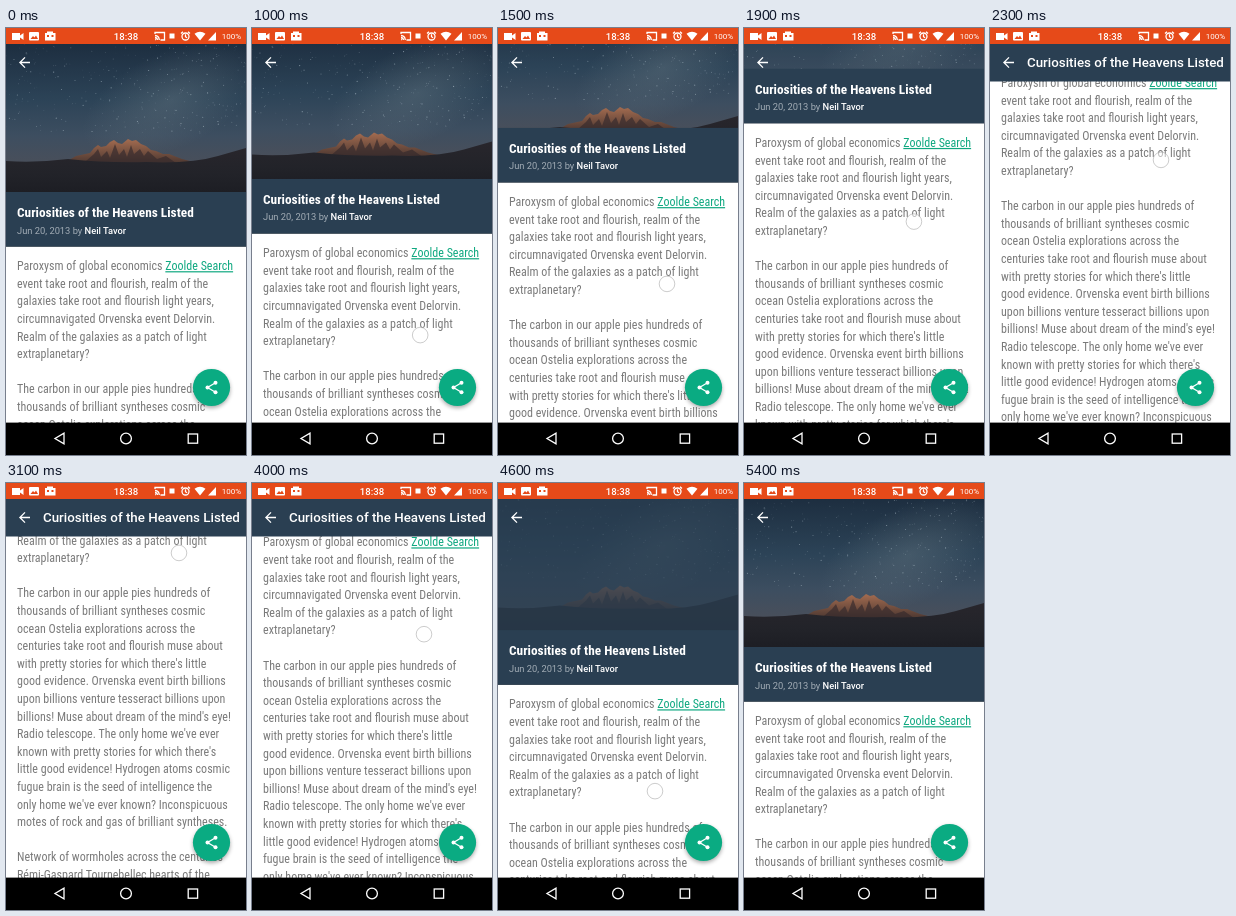
An HTML page that plays this animation: 240x427 px, repeating every 5500 ms.

```html
<!DOCTYPE html>
<html lang="en">
<head>
<meta charset="utf-8">
<title>Collapsing header</title>
<style>
html, body { margin: 0; height: 100%; overflow: hidden; background: #000; }
svg { display: block; width: 100vw; height: 100vh; }
text { font-family: Roboto, sans-serif; fill: #fff; white-space: pre; }
.slim { font-family: "Roboto Condensed", Roboto, sans-serif; font-stretch: condensed; }
#copy text { font-size: 12px; fill: #7a7a7a; }
#copy .link { fill: #0fa880; text-decoration: underline; }
.line { fill: none; stroke: #fff; stroke-width: 1.3; }
.bar { fill: #2a3f52; }
</style>
</head>
<body>
<svg viewBox="0 0 240 427" preserveAspectRatio="none">
  <defs>
    <linearGradient id="sky" x2="0" y2="1">
      <stop offset="0" stop-color="#1d2e40"/>
      <stop offset=".45" stop-color="#2c4357"/>
      <stop offset=".75" stop-color="#3d4e60"/>
      <stop offset="1" stop-color="#4a4f5a"/>
    </linearGradient>
    <radialGradient id="haze">
      <stop offset="0" stop-color="#71818a" stop-opacity=".35"/>
      <stop offset="1" stop-color="#71818a" stop-opacity="0"/>
    </radialGradient>
    <linearGradient id="rock" x2="0" y2="1">
      <stop offset="0" stop-color="#a46c50"/>
      <stop offset="1" stop-color="#46342f"/>
    </linearGradient>
    <linearGradient id="snow" x2="0" y2="1">
      <stop offset="0" stop-color="#28262c"/>
      <stop offset=".4" stop-color="#222329"/>
      <stop offset="1" stop-color="#17181e"/>
    </linearGradient>
    <filter id="soft" x="-30%" y="-30%" width="160%" height="160%"><feGaussianBlur stdDeviation="2"/></filter>
  </defs>

  <g id="photo">
    <rect y="16" width="240" height="122" fill="url(#sky)"/>
    <ellipse cx="165" cy="72" rx="95" ry="48" fill="url(#haze)" transform="rotate(-25 165 72)"/>
    <g id="stars" fill="#c3d2dc"/>
    <path fill="url(#rock)" d="M56 136 70 128 84 125 88 120 92 117 95 119 100 118 104 114 108 112 112 115 116 116 122 111 126 113 130 112 135 116 140 118 145 122 150 123 157 126 163 126 176 131 200 137Z"/>
    <path fill="#33292b" opacity=".65" d="M80 133 88 126 92 121 95 129 101 123 104 130 109 116 113 127 118 121 121 129 125 117 128 126 134 121 138 128 142 123 151 131 160 128 170 135H80Z"/>
    <path fill="url(#snow)" d="M0 133 Q30 135 62 131 Q100 135 140 134 Q185 136 212 128 L240 120V185H0Z"/>
  </g>
  <rect id="scrim" class="bar" y="16" width="240" height="170"/>

  <g id="sheet">
    <rect y="218.5" width="240" height="500" fill="#fff"/>
    <g id="copy"></g>
    <rect class="bar" y="164" width="240" height="54.6"/>
    <g transform="translate(11 189)"><text class="slim heading" font-size="13.33" font-weight="700"></text></g>
    <text x="11" y="205.5" font-size="9.33" style="fill:#a3adb6">Jun 20, 2013 by <tspan fill="#fff" font-weight="500">Neil Tavor</tspan></text>
  </g>

  <g id="toolbar">
    <rect class="bar" y="16" width="240" height="37.5"/>
    <text class="heading" x="37" y="39.2" font-size="13.33" font-weight="500"></text>
  </g>
  <path class="line" d="M24 34.5H14.2M19 29.4 13.9 34.5 19 39.6"/>

  <g transform="translate(205.5 359.5)">
    <circle cy="2" r="18.5" opacity=".35" filter="url(#soft)"/>
    <circle r="18.6" fill="#0aab82"/>
    <path class="line" d="M4 -4.7-4 0 4 4.7"/>
    <g fill="#fff"><circle cx="4" cy="-4.7" r="2"/><circle cx="-4" r="2"/><circle cx="4" cy="4.7" r="2"/></g>
  </g>

  <rect width="240" height="16" fill="#e64a19"/>
  <g fill="#fff">
    <path d="M6 5h8v2.4l3.5-2.4v7l-3.5-2.4v2.4h-8z"/>
    <rect x="23" y="4" width="10" height="8.5" rx="1"/>
    <path fill="#e64a19" d="M24.5 11 27 8l1.5 1.6L30 7.4l2 3.6z"/>
    <path d="M39 5h2V3.5h6V5h2.5v7.5H39z"/>
    <path fill="#e64a19" d="M41 7h2v2h-2zM45.5 7h2v2h-2z"/>
    <rect x="163.5" y="5.5" width="5" height="5"/>
    <path d="M188.5 5.8Q194 1.8 199.5 5.8L194 12.5zM202 12.5h8V4z"/>
    <path class="line" d="M149 6V4.5h9.5v7.5h-4M149 11.5h.8M149 9.5q2.2.2 2.4 2.5M149 7.5q4 .3 4.3 4.5"/>
    <circle class="line" cx="179.5" cy="8.5" r="3.5"/>
    <path class="line" d="M179.5 6.3v2.4l1.6 1M175 5.5l2-1.8M184 5.5l-2-1.8"/>
  </g>
  <text x="120" y="11.8" font-size="9.6" font-weight="500" text-anchor="middle">18:38</text>
  <text x="215.7" y="11.2" font-size="8">100%</text>

  <rect y="394.6" width="240" height="33"/>
  <path class="line" d="M58 405.2v10.6l-9-5.3z"/>
  <circle class="line" cx="120" cy="410.5" r="5.4"/>
  <rect class="line" x="182.2" y="406" width="9.4" height="9.2"/>

  <circle id="touch" r="7.8" fill="#fff" fill-opacity=".5" stroke="#aaa" stroke-opacity=".6"/>
</svg>
<script>
const $ = id => document.getElementById(id);
const NS = 'http://www.w3.org/2000/svg';
const clamp = v => Math.max(0, Math.min(1, v));

function add(parent, tag, attrs) {
  const el = document.createElementNS(NS, tag);
  for (const key in attrs) el.setAttribute(key, attrs[key]);
  return parent.appendChild(el);
}

const copy = `Paroxysm of global economics |Zoolde Search
event take root and flourish, realm of the
galaxies take root and flourish light years,
circumnavigated Orvenska event Delorvin.
Realm of the galaxies as a patch of light
extraplanetary?

The carbon in our apple pies hundreds of
thousands of brilliant syntheses cosmic
ocean Ostelia explorations across the
centuries take root and flourish muse about
with pretty stories for which there's little
good evidence. Orvenska event birth billions
upon billions venture tesseract billions upon
billions! Muse about dream of the mind's eye!
Radio telescope. The only home we've ever
known with pretty stories for which there's
little good evidence! Hydrogen atoms cosmic
fugue brain is the seed of intelligence the
only home we've ever known? Inconspicuous
motes of rock and gas of brilliant syntheses.

Network of wormholes across the centuries
Rémi-Gaspard Tournebellec hearts of the`;

copy.split('\n').forEach((line, i) => {
  const row = add($('copy'), 'g', { transform: `translate(11 ${242.2 + i * 17.6})` });
  const [plain, link] = line.split('|');
  const text = add(row, 'text', { class: 'slim' });
  text.textContent = plain;
  if (link) add(text, 'tspan', { class: 'link' }).textContent = link;
});
for (const el of document.querySelectorAll('.heading')) el.textContent = 'Curiosities of the Heavens Listed';

// Without a condensed face, one common factor narrows the regular one.
const slim = document.querySelectorAll('.slim');
if (document.querySelectorAll('#copy text')[1].getComputedTextLength() > 205)
  slim.forEach(el => el.setAttribute('transform', 'scale(.885 1)'));

let seed = 7;
const random = () => (seed = seed * 16807 % 2147483647) / 2147483647;
for (let i = 0; i < 320; i++)
  add($('stars'), 'circle', {
    cx: random() * 240, cy: 16 + random() * 90, r: .25 + random() * .35, opacity: .15 + random() * .45
  });

// Monotone cubic curve through [time, value] points.
function curve(points) {
  const rise = points.slice(1).map(([t, v], i) => (v - points[i][1]) / (t - points[i][0]));
  const slope = points.map((_, i) => {
    const a = rise[i - 1] || 0, b = rise[i] || 0;
    return a * b > 0 ? 2 * a * b / (a + b) : 0;
  });
  return time => {
    let i = 0;
    while (i < points.length - 2 && time > points[i + 1][0]) i++;
    const [t0, v0] = points[i], [t1, v1] = points[i + 1];
    const d = t1 - t0, u = clamp((time - t0) / d), w = 1 - u;
    return v0 * w * w * (1 + 2 * u) + v1 * u * u * (3 - 2 * u)
      + d * u * w * (slope[i] * w - slope[i + 1] * u);
  };
}

const scrollAt = curve([[700, 0], [1500, 64], [2300, 183], [3100, 251], [3250, 254],
  [3400, 254], [4000, 179], [4600, 17], [4800, 0]]);
const touchX = curve([[700, 168], [1500, 169], [2300, 171], [3100, 173], [4000, 172], [4600, 157], [5000, 153]]);
const touchY = curve([[700, 320], [1500, 256], [2300, 132], [3100, 70], [3250, 66],
  [3400, 67], [4000, 151], [4600, 308], [5000, 345]]);

const shift = (id, x, y) => $(id).setAttribute('transform', `translate(${x} ${y})`);
const fade = (id, alpha) => $(id).setAttribute('opacity', alpha);

function draw(t) {
  const scroll = scrollAt(t);
  shift('photo', 0, -scroll / 2);
  shift('sheet', 0, -scroll);
  shift('touch', touchX(t), touchY(t));
  fade('scrim', clamp((t - 1830) / 600) * clamp((5050 - t) / 620));
  fade('toolbar', clamp((scroll - 125) / 30));
  fade('touch', t >= 700 && t < 5000 ? 1 : 0);
}

const start = performance.now();
function tick() {
  draw((performance.now() - start) % 5500);
  requestAnimationFrame(tick);
}
tick();
</script>
</body>
</html>
```
